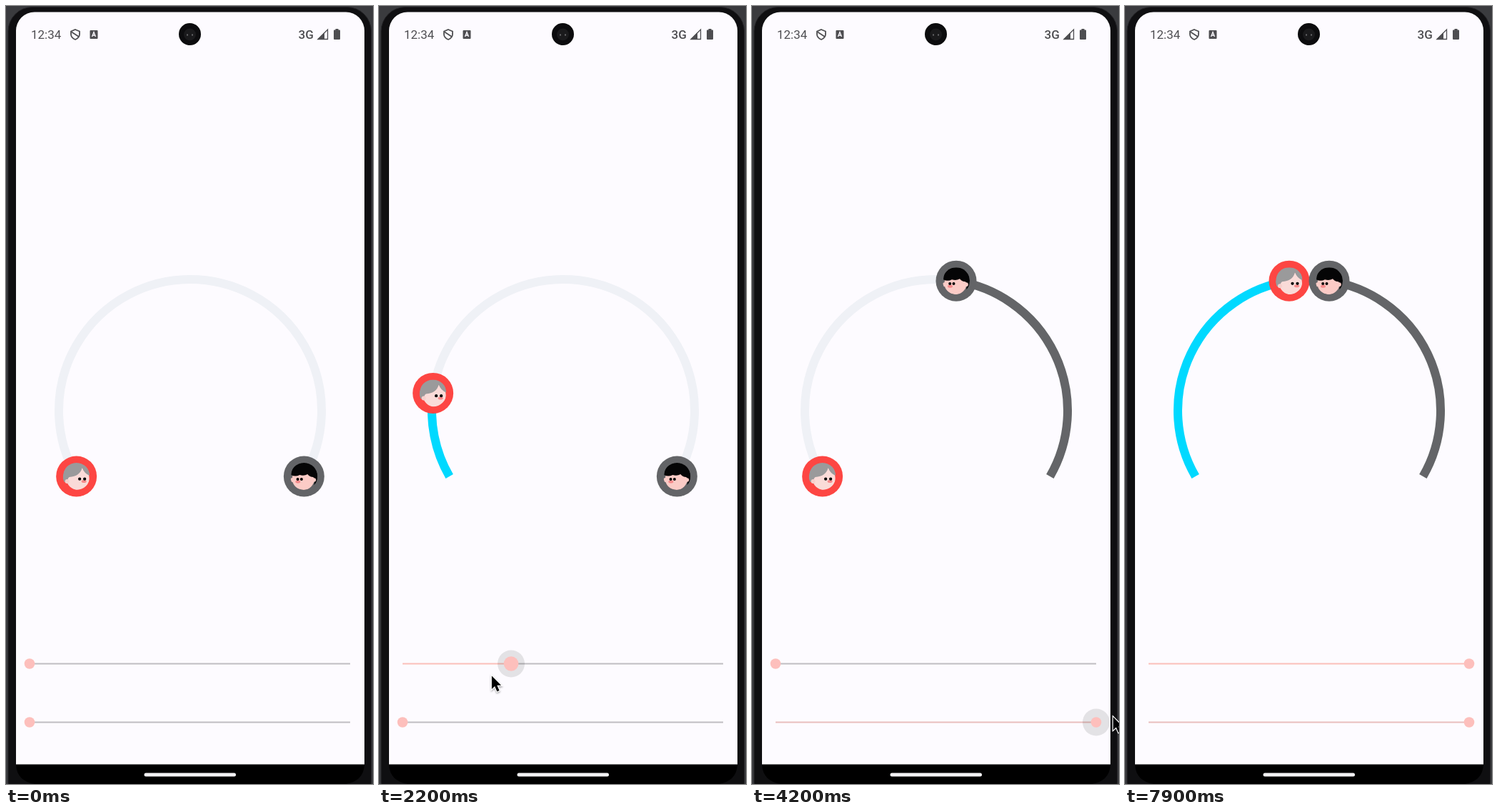
These frames come from a looping animation (514x1090 px, 8 s). An HTML page:

```html
<!DOCTYPE html>
<html lang="en">
<head>
<meta charset="utf-8">
<title>Two-sided gauge</title>
<style>
  html, body { margin: 0; width: 100%; height: 100%; overflow: hidden; background: #0d0d0f; }
  svg { display: block; width: 100vw; height: 100vh; }
  text { font: 17px Roboto, sans-serif; fill: #4e4e51; }
  .network { font-weight: 500; }
  .arc { fill: none; stroke-width: 12; }
</style>
</head>
<body>
<svg viewBox="0 0 514 1090">
  <defs>
    <radialGradient id="glow">
      <stop offset=".5" stop-opacity=".1"/>
      <stop offset="1" stop-opacity="0"/>
    </radialGradient>
    <clipPath id="face"><circle r="19"/></clipPath>
    <filter id="shade" x="-50%" y="-50%" width="200%" height="200%">
      <feDropShadow dx="0" dy="1.5" stdDeviation="1.2" flood-opacity=".4"/>
    </filter>
  </defs>

  <!-- phone -->
  <rect width="514" height="1090" fill="#3a3b3e"/>
  <rect x="3" y="1.5" width="508.5" height="1120" rx="34" fill="#0f0f11" stroke="#222225"/>
  <path d="M14 1050V1064Q16 1086 40 1090H476Q500 1086 502 1064V1050Z" fill="#000"/>
  <path d="M14 1062.500V35A26 26 0 0 1 40 8.500H476A26 26 0 0 1 502 35V1062.500Z" fill="#fdfbff"/>
  <rect x="193.500" y="1074.500" width="128.500" height="5" rx="2.500" fill="#f3f2f4"/>

  <!-- status bar -->
  <circle cx="257.500" cy="39.500" r="15.500" fill="#0c0c0e"/>
  <circle cx="257.500" cy="40" r="8.500" fill="#1a1a1c"/>
  <path d="M253 40.500h2M260 40.500h2" stroke="#68686b" stroke-width="2"/>
  <text x="35" y="46">12:34</text>
  <text class="network" x="409.500" y="45.500">3G</text>
  <g fill="none" stroke="#4e4e51" stroke-width="1.800">
    <path d="M97 33L103 35.500V39.500Q103 44.500 97 47Q91 44.500 91 39.500V35.500Z"/>
    <path d="M92 36.500L102 43"/>
  </g>
  <rect x="117.500" y="34" width="11" height="12" rx="1" fill="#4e4e51"/>
  <path d="M120.500 43L123 36.500L125.500 43M121.500 41H124.500" fill="none" stroke="#fdfbff" stroke-width="1.300"/>
  <path d="M437 46.500L450.500 33V46.500Z" fill="none" stroke="#4e4e51" stroke-width="1.300"/>
  <path d="M436 47L446 37V47Z" fill="#4e4e51"/>
  <path d="M459 34.500Q459 33.500 460 33.500H461.500V32H465.500V33.500H467Q468 33.500 468 34.500V46Q468 47 467 47H460Q459 47 459 46Z" fill="#4e4e51"/>

  <!-- gauge -->
  <path class="arc" d="M98.650 659A184 184 0 1 1 417.350 659" stroke="#eff1f6"/>
  <path class="arc" id="arc0" stroke="#00d9ff"/>
  <path class="arc" id="arc1" stroke="#646568"/>
  <g id="head0">
    <circle r="28.500" fill="#fd4643"/>
    <g clip-path="url(#face)">
      <circle cx="2" cy="3" r="16" fill="#fadbd8"/>
      <path d="M-19 2Q-18 -19 0 -19Q18 -19 18.500 -1Q11 -4 8 -12Q5 0 -10 1Q-13 3 -13 10L-18 7Z" fill="#9a9a9b"/>
      <circle cx="-13" cy="7" r="3" fill="#f6d0cd"/>
      <ellipse cx="10.500" cy="7" rx="3.500" ry="2" fill="#f68a8b"/>
      <circle cx="4.500" cy="3.700" r="2.100"/>
      <circle cx="11.500" cy="3.700" r="2.100"/>
    </g>
  </g>
  <g id="head1">
    <circle r="28.500" fill="#636467"/>
    <g clip-path="url(#face)">
      <circle cx="-1" cy="3.500" r="15.500" fill="#fbcbc6"/>
      <circle cx="-16" cy="5" r="3" fill="#fbcbc6"/>
      <path d="M-18 -2Q-17 -19 0 -19Q18 -19 19 -1Q19 9 14 12Q16 5 13 1Q8 1 5 -3Q0 0 -6 -2Q-12 1 -18 -2Z" fill="#050506"/>
      <circle cx="14" cy="5" r="2.800" fill="#fbcbc6"/>
      <ellipse cx="-8.500" cy="7.500" rx="3.500" ry="2" fill="#f68a8b"/>
      <circle cx="-8.800" cy="3.900" r="2"/>
      <circle cx="-3.500" cy="3.900" r="2"/>
    </g>
  </g>

  <g id="sliders"></g>
  <path id="cursor" d="M.8 1V19.500L5 15.600L8.300 23L11.400 21.600L8.200 14.400H14Z"
        stroke="#fff" stroke-width="2.200" paint-order="stroke" filter="url(#shade)"/>
</svg>
<script>
const LOOP = 8000, STEP = 100, LAG = 28;
const LEFT = 33, RIGHT = 482;
const CX = 258, CY = 567, R = 184, SWEEP = 111.25;
const SHOWN = 300, HIDDEN = 6300;

const $ = id => document.getElementById(id);
const set = (el, attrs) => { for (const k in attrs) el.setAttribute(k, attrs[k]); };
const clamp = (v, lo, hi) => Math.min(hi, Math.max(lo, v));
const swing = p => (1 - Math.cos(Math.PI * p)) / 2;
const flick = p => 1 - (1 - p) ** 3;

// pointer stops; every thumb position follows from these
const stops = [
  { t: SHOWN, x: 412, y: 905 },
  { t: 931, x: 33, y: 920 },
  { t: 1431, x: 508, y: 934 },
  { t: 1746, x: 508, y: 970 },
  { t: 2446, x: 24, y: 925 },
  { t: 3467, x: 33, y: 995 },
  { t: 4067, x: 505, y: 1004, ease: flick },
  { t: 4200, x: 505, y: 995 },
  { t: 4800, x: 33, y: 919 },
  { t: 4995, x: 33, y: 919 },
  { t: 5595, x: 497, y: 923 }
];

const sliders = [
  { y: 921.5, line: '#fbbfb9', drags: [{ down: 931, up: 2500 }, { down: 4995, up: 5900 }] },
  { y: 1003.5, line: '#e9bebd', drags: [{ down: 3467, up: 4150 }] }
];

function pointer(t) {
  const next = stops.findIndex(s => s.t > t);
  if (next < 1) return next ? stops[stops.length - 1] : stops[0];
  const a = stops[next - 1], b = stops[next];
  const p = (b.ease || swing)((t - a.t) / (b.t - a.t));
  return { x: a.x + (b.x - a.x) * p, y: a.y + (b.y - a.y) * p };
}

$('sliders').innerHTML = sliders.map(({ y, line }) => `
  <g transform="translate(0 ${y})" stroke-width="2.2">
    <path class="rest" stroke="#bfbdc1"/>
    <path class="fill" stroke="${line}"/>
    <g class="thumb">
      <circle class="halo" r="19"/>
      <circle class="ripple" r="19" fill="url(#glow)"/>
      <path class="edge" d="M-13 -10Q-19 0 -13 10Q-22 7 -19 0Q-22 -7 -13 -10Z" opacity=".1"/>
      <circle class="knob" fill="#fdbfbc"/>
    </g>
  </g>`).join('');
sliders.forEach((s, i) => {
  for (const el of $('sliders').children[i].querySelectorAll('[class]'))
    s[el.getAttribute('class')] = el;
});

function drawSlider(s, t) {
  const drag = s.drags.filter(d => d.down <= t).pop();
  const x = drag ? clamp(pointer(Math.min(t, drag.up) - LAG).x, LEFT, RIGHT) : LEFT;
  const age = drag ? t - drag.down : -1;
  const held = drag && t < drag.up;
  const spread = age >= 200;
  const fade = drag ? clamp(1 - (t - drag.up - 50) / 300, 0, 1) : 0;
  set(s.rest, { d: `M${x} 0H${RIGHT}` });
  set(s.fill, { d: `M${LEFT} 0H${x}` });
  set(s.thumb, { transform: `translate(${x} 0)` });
  set(s.halo, { opacity: spread ? 0.1 * fade : 0 });
  set(s.ripple, { opacity: spread ? clamp(1 - (age - 200) / 350, 0, 1) : 0 });
  set(s.edge, { visibility: age >= 0 && !spread ? 'visible' : 'hidden' });
  set(s.knob, { r: held ? 10.3 : 7.3 });
  return (x - LEFT) / (RIGHT - LEFT);
}

function drawGauge(i, value) {
  const side = i ? 1 : -1;
  const point = deg => {
    const a = deg * Math.PI / 180;
    return `${CX + side * R * Math.cos(a)} ${CY - R * Math.sin(a)}`;
  };
  const end = point(value * SWEEP - 30);
  set($('arc' + i), { d: value ? `M${point(-30)}A${R} ${R} 0 0 ${1 - i} ${end}` : '' });
  set($('head' + i), { transform: `translate(${end})` });
}

function draw(now) {
  // the screen refreshes ten times a second
  const t = Math.floor(now % LOOP / STEP) * STEP;
  sliders.forEach((s, i) => drawGauge(i, drawSlider(s, t)));
  const { x, y } = pointer(t);
  set($('cursor'), {
    transform: `translate(${x} ${y})`,
    visibility: t >= SHOWN && t < HIDDEN ? 'visible' : 'hidden'
  });
}

const start = performance.now();
function loop() {
  draw(performance.now() - start);
  requestAnimationFrame(loop);
}
loop();
</script>
</body>
</html>
```
